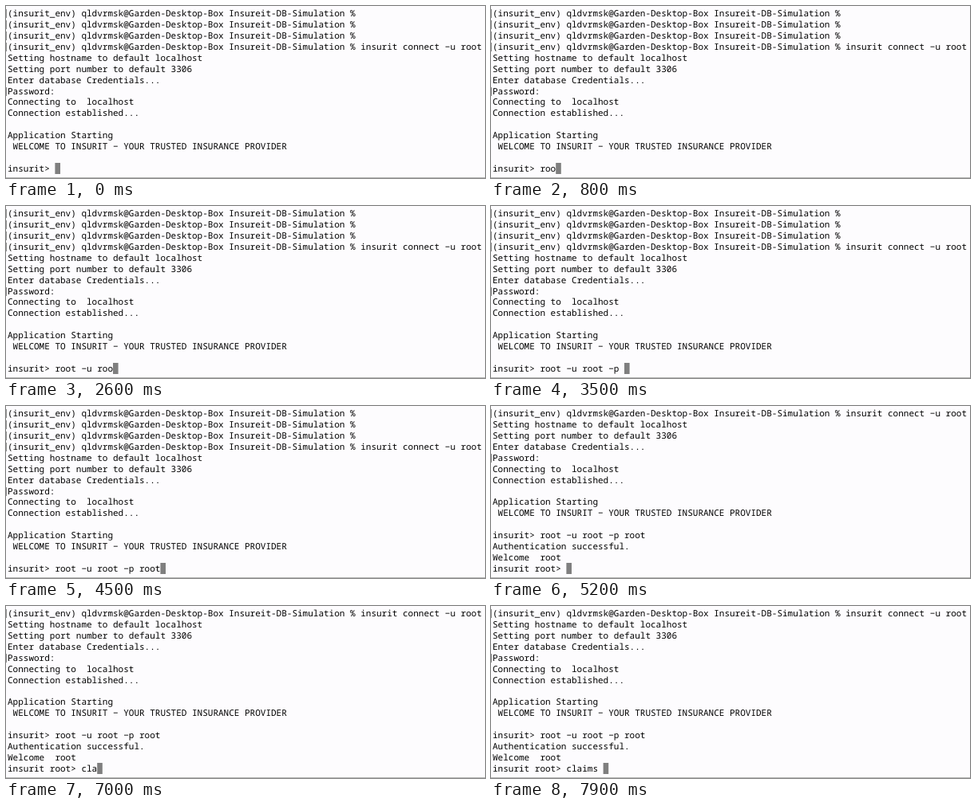
Write an HTML page with a canvas that moves like this. It is 600 by 216 pixels and loops after 8000 ms.

```html
<!DOCTYPE html>
<html lang="en">
<head>
<meta charset="utf-8">
<title>Terminal session</title>
<style>
  html, body { margin: 0; width: 100%; height: 100%; overflow: hidden; background: #fdfcfe; }
  canvas { display: block; }
</style>
</head>
<body>
<canvas id="stage" width="600" height="216"></canvas>
<script>
const ctx = document.getElementById('stage').getContext('2d');
const LOOP = 8000, SUBMIT = 5200;
const CELL = 6.6, LINE = 13.93, LEFT = 2, BASE = 13;

const shell = '(insurit_env) qldvrmsk@Garden-Desktop-Box Insureit-DB-Simulation % ';
const history = [
  shell, shell, shell,
  shell + 'insurit connect −u root',
  'Setting hostname to default localhost',
  'Setting port number to default 3306',
  'Enter database Credentials...',
  'Password:',
  'Connecting to  localhost',
  'Connection established...',
  '',
  'Application Starting',
  ' WELCOME TO INSURIT − YOUR TRUSTED INSURANCE PROVIDER',
  ''
];
const login = {
  prompt: 'insurit> ',
  text: 'root −u root −p root',
  keys: [500, 700, 800, 1000, 1200, 1600, 2000, 2100, 2300, 2500,
         2600, 2700, 3000, 3100, 3300, 3500, 3700, 3900, 4000, 4100]
};
const query = {
  prompt: 'insurit root> ',
  text: 'claims ',
  keys: [6700, 6800, 6900, 7100, 7200, 7400, 7600]
};

const typed = ({ prompt, text, keys }, t) =>
  prompt + text.slice(0, keys.filter(k => k <= t).length);

function screen(t) {
  if (t < SUBMIT) return [...history, typed(login, t)];
  return [
    ...history.slice(3),
    login.prompt + login.text,
    'Authentication successful.',
    'Welcome  root',
    typed(query, t)
  ];
}

function drawLine(text, row) {
  const y = BASE + row * LINE;
  if (text.startsWith('(') || text.startsWith('Password')) {
    ctx.fillStyle = '#8c8c8c';
    ctx.fillRect(0, Math.round(y - 9), 1, 11);
  }
  ctx.fillStyle = '#000';
  [...text].forEach((ch, i) => ctx.fillText(ch, LEFT + i * CELL, y));
}

function draw(t) {
  ctx.fillStyle = '#fdfcfe';
  ctx.fillRect(0, 0, 600, 216);
  ctx.fillStyle = '#b9b9b9';
  ctx.fillRect(0, 215, 600, 1);

  ctx.font = '11px "Noto Sans Mono", "DejaVu Sans Mono", monospace';
  ctx.textRendering = 'geometricPrecision';
  const lines = screen(t);
  lines.forEach(drawLine);

  const column = lines[lines.length - 1].length;
  ctx.fillStyle = '#7f7f7f';
  ctx.fillRect(LEFT + column * CELL, 197, CELL, 14);
}

const start = performance.now();
function tick() {
  draw((performance.now() - start) % LOOP);
  requestAnimationFrame(tick);
}
tick();
</script>
</body>
</html>
```
